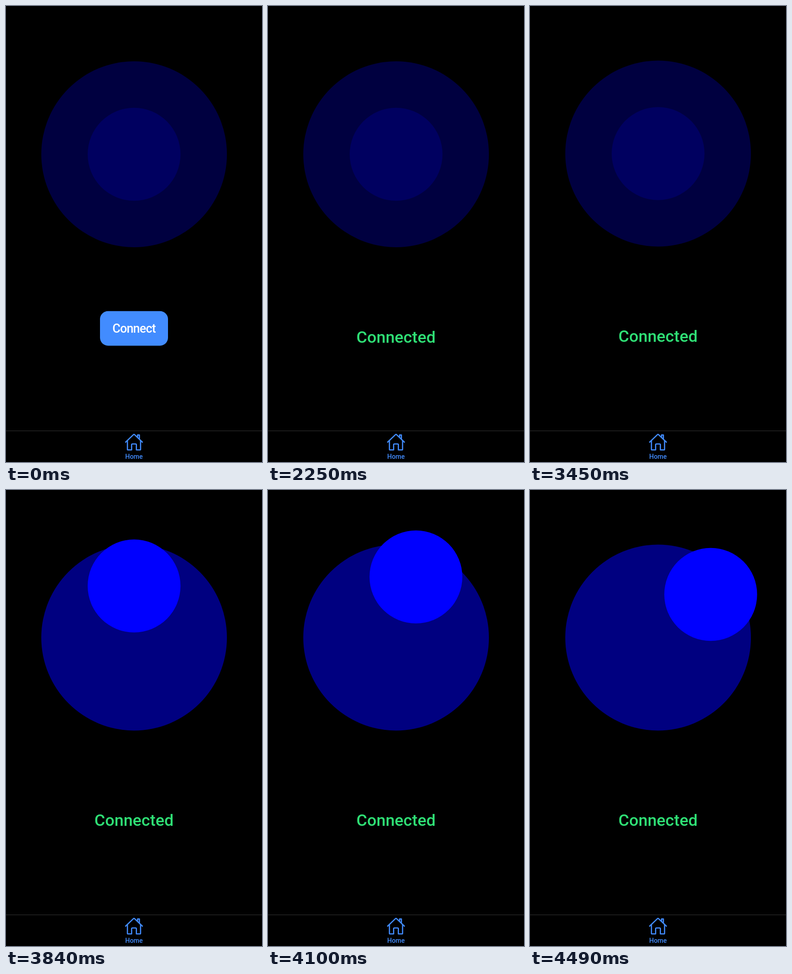
Animation, 561 px wide and 998 px high, one loop 5990 ms. Source, as an HTML page:

```html
<!DOCTYPE html>
<html lang="en">
<head>
<meta charset="utf-8">
<title>Joystick</title>
<style>
  html, body { margin: 0; width: 100%; height: 100%; overflow: hidden; background: #000; }
  svg { display: block; width: 561px; height: 998px; }
  text { font-family: Roboto, sans-serif; font-weight: 500; text-anchor: middle; }
</style>
</head>
<body>
<svg viewBox="0 0 561 998">
  <g id="page">
    <circle id="base" cx="280.7" cy="324.5" r="203.4"/>
    <circle id="knob" cx="280.7" cy="324.5" r="101.7"/>
    <g id="button">
      <rect id="face" x="206" y="667.8" width="149" height="75.6" rx="17.5"/>
      <text x="280.5" y="715" font-size="26.93" letter-spacing="-.808" fill="#fff">Connect</text>
    </g>
    <text id="status" x="280.5" y="736.5" font-size="35.9" fill="#2fdf75">Connected</text>
  </g>
  <rect y="929" width="561" height="1.5" fill="#242424"/>
  <g transform="translate(259.55 933.6) scale(.0818)" fill="none" stroke="#428cff"
     stroke-width="32" stroke-linecap="round" stroke-linejoin="round">
    <path d="M80 212v236a16 16 0 0 0 16 16h96V328a24 24 0 0 1 24-24h80a24 24 0 0 1 24 24v136h96a16 16 0 0 0 16-16V212"/>
    <path d="M480 256L267 52c-5-5-17-5-22 0L32 256M400 179V64h-48v69"/>
  </g>
  <text x="280.5" y="991.2" font-size="14.3" fill="#428cff">Home</text>
</svg>
<script>
const LOOP = 5990, PRESS = 1500, CONNECTED = 2250, GRAB = 3450, STEP = 130;
const el = id => document.getElementById(id);
const set = (id, name, value) => el(id).setAttribute(name, value);

// Knob offset after each drag step: straight up, then slowing down to the right.
function drag(step) {
  if (step < 1) return [0, 0];
  if (step <= 4) return [0, 16 - 43 * step];
  const s = 1 - (1 - (step - 4) / 4) ** 1.645;
  return [115.3 * s, -156 + 61.5 * s];
}

function draw() {
  const t = performance.now() % LOOP;
  const step = Math.max(0, Math.min(8, Math.floor((t - GRAB) / STEP)));
  const connected = t >= CONNECTED;
  const pressed = t >= PRESS && !connected;
  const raised = pressed || t >= GRAB;

  set('page', 'transform', `translate(0 ${raised ? -1.5 : 0})`);
  set('base', 'fill', step ? '#000080' : '#000040');
  set('knob', 'fill', step ? '#0000ff' : '#000060');
  set('knob', 'transform', `translate(${drag(step)})`);
  set('face', 'fill', pressed ? '#3a7be0' : '#428cff');
  set('button', 'display', connected ? 'none' : 'inline');
  set('status', 'display', connected ? 'inline' : 'none');
  requestAnimationFrame(draw);
}
draw();
</script>
</body>
</html>
```
